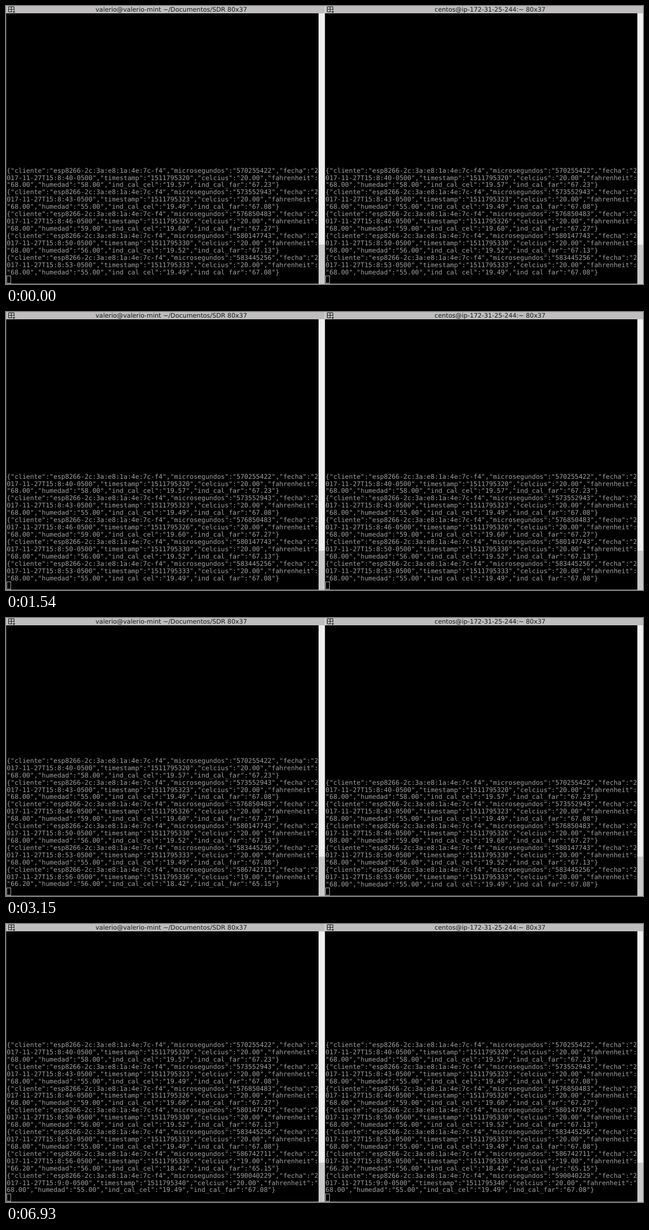
An HTML page that plays this animation: 1131 by 495 pixels, repeating every 8000 ms.

```html
<!DOCTYPE html>
<html lang="es">
<head>
<meta charset="utf-8">
<title>Sensor log</title>
<style>
  :root { --row: 12.93px; --loop: 8s step-end infinite; }
  html, body { margin: 0; width: 100%; height: 100%; overflow: hidden; background: #000; }
  #stage { position: relative; width: 1131px; height: 495px; overflow: hidden; background: #000; }
  #stage > * { position: absolute; }

  .pane { top: 0; height: 495px; overflow: hidden; }
  .pane > * { position: absolute; }
  .left { left: 0; width: 566px; --shift: left-log; }
  .right { left: 566px; width: 565px; --shift: right-log; }
  .bar { inset: 0 0 auto; height: 13px; background: #bfbdbd; }
  .right .bar { border-left: 1px solid #e9e8e8; }
  .title {
    top: 0; width: 587px; text-align: center; white-space: pre; color: #1a1a1a;
    font: 11.15px/13px "DejaVu Sans", sans-serif; text-rendering: geometricPrecision;
  }
  .grid { left: 4px; top: 1px; width: 13px; height: 12px; }
  .scroll { top: 13px; right: 0; width: 11px; height: 482px; background: #f0efee; }
  .right .scroll { width: 10px; }
  .scroll::after {
    content: ""; position: absolute; inset: 412px 0 0; background: #cbc9c8;
  }
  .view { left: 0; top: 13px; width: 555px; height: 467.4px; overflow: hidden; }
  .log {
    position: absolute; left: 1.3px; bottom: 0; white-space: pre; color: #a0a0a0;
    font: 11.49px/var(--row) "DejaVu Sans Mono", monospace; text-rendering: geometricPrecision;
    font-variant-ligatures: none; animation: var(--shift) var(--loop);
  }
  .log div { height: var(--row); }
  .cursor { left: 1px; top: 480px; width: 6px; height: 12px; border: 1px solid #a0a0a0; }
  .edge { left: 0; top: 13px; width: 1px; height: 482px; background: #444; }
  .base { left: 0; right: 0; top: 494px; height: 1px; background: #777; }

  @keyframes left-log {
    0% { bottom: calc(var(--row) * -6); }
    39.375% { bottom: calc(var(--row) * -3); }
    86.625%, 100% { bottom: 0; }
  }
  @keyframes right-log {
    0% { bottom: calc(var(--row) * -6); }
    41.125% { bottom: calc(var(--row) * -3); }
    86.625%, 100% { bottom: 0; }
  }

  #strip { inset: 0 0 auto; height: 54px; background: #000; opacity: 0; animation: strip var(--loop); }
  #desktop { left: 0; top: 0; opacity: 0; animation: desktop var(--loop); }
  @keyframes strip { 0% { opacity: 0; } 18.375% { opacity: 1; } 19.25%, 100% { opacity: 0; } }
  @keyframes desktop { 0% { opacity: 0; } 29.75% { opacity: 1; } 30.625%, 100% { opacity: 0; } }

  #desktop text {
    font: 11.1px "Noto Sans", sans-serif; fill: #fff; text-anchor: middle;
    text-rendering: geometricPrecision; text-shadow: 0 1px 2px #000;
  }
</style>
</head>
<body>
<div id="stage">
  <div id="strip"></div>

  <svg id="desktop" width="1131" height="495" viewBox="0 0 1131 495">
    <defs>
      <radialGradient id="wall" gradientUnits="userSpaceOnUse" cx="0" cy="0" r="1"
        gradientTransform="translate(570 230) scale(680 430)">
        <stop offset="0" stop-color="#3d3d3d"/>
        <stop offset=".5" stop-color="#323232"/>
        <stop offset="1" stop-color="#1b1b1b"/>
      </radialGradient>
      <linearGradient id="mirror" x2="0" y2="1">
        <stop offset="0" stop-color="#4d5a38"/>
        <stop offset="1" stop-color="#2b2d28"/>
      </linearGradient>
      <path id="sheet" d="M2 0H20L31 11V38a2 2 0 0 1-2 2H2a2 2 0 0 1-2-2V2a2 2 0 0 1 2-2Z"/>
      <path id="fold" d="M20 0L31 11H22a2 2 0 0 1-2-2Z" fill="#fff" opacity=".35"/>
      <g id="web">
        <use href="#sheet" fill="#6f97c8"/>
        <use href="#fold"/>
        <g fill="none" stroke="#fff" stroke-width="1.2">
          <circle cx="15.500" cy="22.500" r="7.300"/>
          <ellipse cx="15.500" cy="22.500" rx="3.400" ry="7.300"/>
          <path d="M15.500 15.200v14.600M8.200 22.500h14.600M9.300 18.800h12.400M9.300 26.200h12.400"/>
        </g>
      </g>
    </defs>

    <path d="M0 76H255L407 161H1131V495H0Z" fill="url(#wall)"/>
    <path d="M0 0H120L131 9H136L142 13H555V40H566V13H1121V39H1131V161H407L255 76H0Z"/>

    <rect x="749" y="391" width="160" height="104" fill="url(#mirror)"/>
    <rect x="753" y="238" width="150" height="150" fill="#82ad3c"/>

    <g transform="translate(35 282)">
      <use href="#sheet" fill="#0ba797"/>
      <use href="#fold"/>
      <path d="M21 16H13a3.300 3.300 0 0 0 0 6.600H18a3.300 3.300 0 0 1 0 6.600H10"
        fill="none" stroke="#fff" stroke-width="1.800"/>
    </g>
    <use href="#web" x="35" y="368"/>
    <use href="#web" x="147" y="455"/>

    <g transform="translate(125 282)">
      <path d="M0 0H74V40H0Z" fill="#fbfbfb"/>
      <path d="M0 0H74V2H0Z" fill="#4778a8"/>
      <path d="M2 5H24M2 8H17M2 11H30M2 14H26" stroke="#c9d3df"/>
      <path d="M2 20.500H7M57 20.500H62" stroke="#59a5e0" stroke-width="2"/>
      <path d="M20 20.500H25M38 20.500H43" stroke="#8cc87a" stroke-width="2"/>
      <path d="M2 35L8 29L14 33L20 27M26 34L34 28L42 33M50 28L58 35L70 27M3 38H70"
        fill="none" stroke="#c5d0da" stroke-width=".8"/>
    </g>

    <g transform="translate(117 367)">
      <path d="M0 0H90V42H0Z" fill="#fff"/>
      <path d="M3 9H36V35H3Z" fill="#16728c"/>
      <path d="M0 12H8V18H0ZM0 28H9V33H0Z" fill="#8b9699"/>
      <path d="M16 25H32V29H16ZM9 11H33V13H9Z" fill="#243c45"/>
      <path d="M49 7H86V35H49Z" fill="#d9d9d5"/>
      <path d="M51 10H84M51 32H84" stroke="#b9b9b5" stroke-dasharray="1 1"/>
      <path d="M62 21H72V30H62Z" fill="#334a30"/>
      <path d="M72 14H79V22H72Z" fill="#3c8fc4"/>
      <path d="M24 9V3H52V18M36 15H56V27M36 20H62" fill="none" stroke="#4bb860"/>
      <path d="M22 35V39H46V33M86 8H89V33H78" fill="none" stroke="#d6a544"/>
    </g>

    <g>
      <rect x="4" y="460" width="12" height="12" rx="2" fill="#e7d58e"/>
      <path d="M0 484H20V492H0Z" fill="#d6eeee"/>
      <path d="M2 488H18" stroke="#56aaa8" stroke-width="2" stroke-dasharray="3 1"/>
      <rect x="34" y="469" width="20" height="19" rx="2" fill="#f1f3f3"/>
      <circle cx="44" cy="478" r="5" fill="#4a6670"/>
      <path d="M27 474v2M60 463v2M60 478v2M26 486v2" stroke="#8bc6cb" stroke-width="2"/>
      <rect x="68" y="456" width="33" height="34" rx="3" fill="#c6e8c8"/>
      <circle cx="84.500" cy="461" r="4" fill="#40b45b"/>
      <path d="M71 467H83V486H71ZM86 467H98V486H86Z" fill="#e9f3df"/>
      <circle cx="77" cy="473" r="4" fill="#d9c34c"/>
      <circle cx="92" cy="473" r="4" fill="#6f93c4"/>
      <path d="M73 482H81M88 482H96" stroke="#8bb28b" stroke-width="2"/>
    </g>

    <text x="51.500" y="335">Apache-nifi-logo.</text>
    <text x="51.500" y="351">svg</text>
    <text x="51.500" y="422">Apache-nifi-logo.</text>
    <text x="51.500" y="437">svg.html</text>
    <text x="162" y="335">Imagen8.png</text>
    <text x="162" y="422">Faustino_bb.png</text>
  </svg>
</div>

<script>
  // microseconds, clock, epoch, celsius, fahrenheit, humidity, heat index C, heat index F
  const readings = [
    ["570255422", "8:40", 320, "20.00", "68.00", 58, "19.57", "67.23"],
    ["573552943", "8:43", 323, "20.00", "68.00", 55, "19.49", "67.08"],
    ["576850483", "8:46", 326, "20.00", "68.00", 59, "19.60", "67.27"],
    ["580147743", "8:50", 330, "20.00", "68.00", 56, "19.52", "67.13"],
    ["583445256", "8:53", 333, "20.00", "68.00", 55, "19.49", "67.08"],
    ["586742711", "8:56", 336, "19.00", "66.20", 56, "18.42", "65.15"],
    ["590040229", "9:0", 340, "20.00", "68.00", 55, "19.49", "67.08"],
  ];

  const toJson = ([micros, clock, epoch, cel, far, hum, indCel, indFar]) => JSON.stringify({
    cliente: "esp8266-2c:3a:e8:1a:4e:7c-f4",
    microsegundos: micros,
    fecha: `2017-11-27T15:${clock}-0500`,
    timestamp: `1511795${epoch}`,
    celcius: cel,
    fahrenheit: far,
    humedad: `${hum}.00`,
    ind_cal_cel: indCel,
    ind_cal_far: indFar,
  });

  const rows = readings
    .flatMap(r => toJson(r).match(/.{1,80}/g))
    .map(line => `<div>${line}</div>`)
    .join("");

  const pane = (side, title) => `
    <div class="pane ${side}">
      <div class="bar"></div>
      <svg class="grid" viewBox="0 0 13 12" fill="none" stroke="#1a1a1a">
        <path d="M.5 .5H10.500V7M.5 .5V9.500H7M5.500 .5V9.500M.5 5H10.500"/>
        <path d="M7.500 8.500H12.500L10 11.500Z" fill="#1a1a1a" stroke="none"/>
      </svg>
      <div class="title">${title}</div>
      <div class="view"><div class="log">${rows}</div></div>
      <div class="edge"></div>
      <div class="base"></div>
      <div class="cursor"></div>
      <div class="scroll"></div>
    </div>`;

  document.getElementById("stage").insertAdjacentHTML("afterbegin",
    pane("left", "valerio@valerio-mint ~/Documentos/SDR 80x37") +
    pane("right", "centos@ip-172-31-25-244:~ 80x37"));
</script>
</body>
</html>
```
